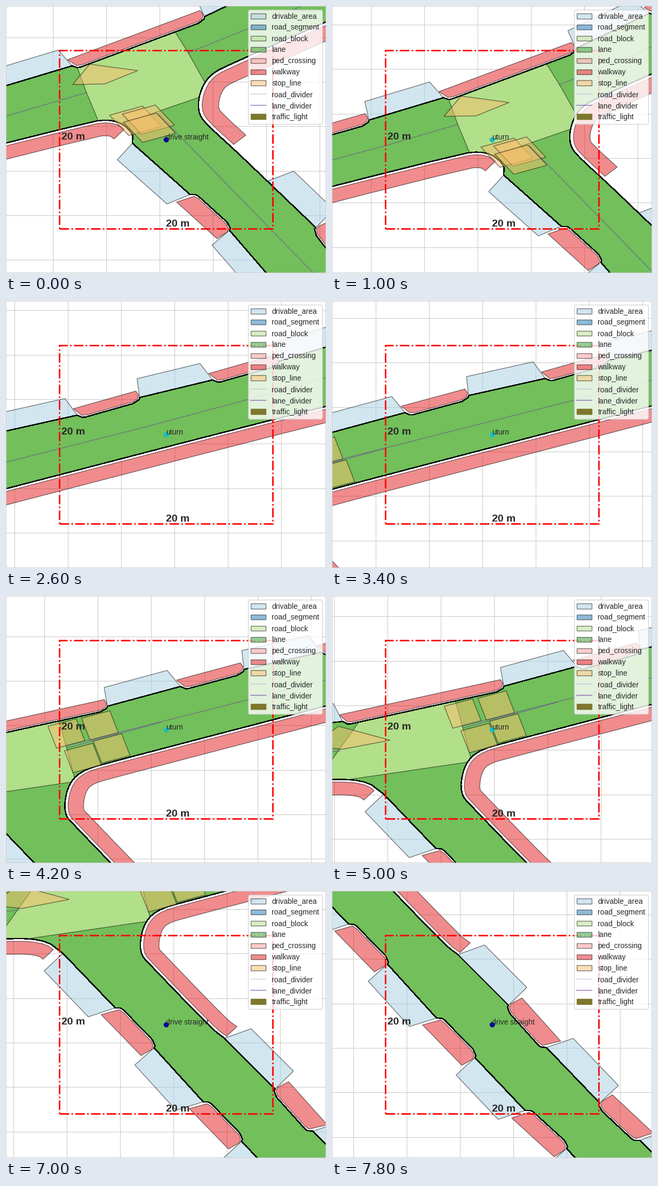
Recreate the animation shown at these times as a matplotlib script. Size 600 by 500 pixels, loop 8000 ms.

```python
import numpy as np
import matplotlib.pyplot as plt
from matplotlib.animation import FuncAnimation
from matplotlib.lines import Line2D
from matplotlib.patches import Patch, Polygon, Rectangle

plt.rcParams.update({
    "font.family": "Liberation Sans", "font.size": 10,
    "text.color": ".15", "figure.dpi": 100,
})

FRAMES, INTERVAL = 40, 200
W, H = 600, 500
M = np.array([20, 50 / 3])  # pixels per metre

# Local origins of the map sections, in pixels
EAST, MID, WEST, SOUTH = (0, 0), (794, -110), (1216, -308), (952, -598)

COLORS = {
    "drivable_area": "#a6cee3", "road_segment": "#1f78b4",
    "road_block": "#b2df8a", "lane": "#33a02c",
    "ped_crossing": "#fb9a99", "walkway": "#e31a1c",
    "stop_line": "#fdbf6f", "road_divider": "#cab2d6",
    "lane_divider": "#6a3d9a", "traffic_light": "#7e772e",
}
EDGE = (0, 0, 0, 0.5)


def at(origin, *xy):
    return np.reshape(xy, (-1, 2)) - np.array(origin, float)


def join(*parts):
    return np.vstack(parts)


def smooth(pts, rounds=2):
    """Round the corners of an open line by corner cutting."""
    for _ in range(rounds):
        a, b = pts[:-1], pts[1:]
        cut = np.stack([0.75 * a + 0.25 * b, 0.25 * a + 0.75 * b], 1)
        pts = join(pts[:1], cut.reshape(-1, 2), pts[-1:])
    return pts


def band(pts, near=0.3, far=1.75):
    """Pavement on the right of a line, between two distances in metres."""
    p = pts / M
    t = np.gradient(p, axis=0)
    t /= np.linalg.norm(t, axis=1, keepdims=True)
    n = np.column_stack([-t[:, 1], t[:, 0]])
    return join(p + n * near, (p + n * far)[::-1]) * M


drivable, walkways = [], []


def frontage(marks, side, bay, reach, depth):
    """Alternate driveway bays and kerbs between marks; return the road edge."""
    edge = [marks[:1]]
    for a, b in zip(marks / M, marks[1:] / M):
        length = np.linalg.norm(b - a)
        u = (b - a) / length
        n = side * np.array([u[1], -u[0]])

        def local(*sd):
            return (a + np.reshape(sd, (-1, 2)) @ [u, n]) * M

        if bay:
            drivable.append(local(0, -0.4, 0, 0, 0.17 * depth, depth,
                                  length - 0.3 * depth, depth, length, 0, length, -0.4))
        else:
            walkways.append(local(-0.15 * reach, reach, length - 0.1, reach, length, 0.3,
                                  length - 0.2, -0.05, length - 0.7, -0.27,
                                  0.9, -0.27, 0.4, -0.15))
            edge.append(local(0.35, -0.38, 0.65, -0.45, length - 0.8, -0.45, length - 0.1, -0.2))
        edge.append(b[None] * M)
        bay = not bay
    return join(*edge)


# Road edges
north = frontage(join(
    at(WEST, -60, 132, 120, 114),
    at(MID, 0, 246, 137, 209, 256, 177, 400, 145, 517, 112, 654, 79, 778, 44),
    at(EAST, 124, 112, 372, 20, 510, -46, 640, -105)), 1, True, 0.8, 2.1)
south_west = frontage(
    at(SOUTH, -67, -40, 31, 62, 104, 137, 196, 238, 268, 312, 362, 411, 440, 482, 560, 617),
    -1, True, 1.5, 2.6)
south_east = frontage(
    at(SOUTH, 720, 605, 577, 467, 502, 397, 402, 293, 331, 214, 236, 119),
    -1, True, 1.5, 2.6)
east_left = frontage(at(EAST, 237, 257, 345, 353, 419, 420, 540, 560), -1, True, 1.5, 2.3)
east_right = frontage(at(EAST, 640, 492, 581, 415, 490, 328), -1, False, 1.5, 2.6)

west_corner = smooth(at(WEST, -60, 228, 60, 223, 160, 222, 197, 250))
east_corner = smooth(at(EAST, 490, 328, 425, 266, 385, 230, 360, 203, 362, 163,
                        382, 128, 425, 107, 640, 12))
block = smooth(join(
    at(WEST, 500, 409, 477, 392, 362, 273, 340, 249, 346, 200, 370, 170, 425, 153),
    at(EAST, 150, 217, 205, 212, 238, 236, 237, 257)))
walkways += [band(west_corner[:-3]), band(east_corner[6:], 0.35, 1.9), band(block[:-7])]

road = join(north, east_corner[::-1], east_right[::-1], east_left[::-1],
            block[::-1], south_east[::-1], south_west[::-1], west_corner[::-1])

junctions = [
    at(EAST, 132, 110, 150, 160, 176, 222, 210, 223, 365, 170, 374, 145, 343, 90, 313, 42),
    at(WEST, 158, 104, 70, 228, 95, 228, 362, 189, 346, 128, 331, 75),
]


def boxes(centres, u, v):
    u, v = np.array(u) / 2, np.array(v) / 2
    return [c + [-u - v, u - v, u + v, v - u] for c in centres]


stops = [at(EAST, 157, 109, 247, 121, 185, 146, 125, 147),
         at(WEST, 62, 160, 112, 123, 209, 149, 120, 166)]
stops += boxes(at(EAST, 243, 215, 267, 213, 269, 228), (62, -17), (36, 38))
stops += boxes(at(WEST, 345, 99, 408, 84, 376, 145, 430, 127), (53, -14), (16, 41))

dividers = [
    at(EAST, 285, 202, 385, 304, 660, 586),
    at(EAST, 341, 88, 455, 42, 640, -36),
    join(at(EAST, 151, 162, 18, 201, -262, 276), at(WEST, 345, 122)),
    join(at(MID, 100, 276), at(WEST, 347, 126)),
    at(WEST, -60, 184, 0, 180, 115, 169),
]


def spline(t, knots, vals):
    """Natural cubic spline through the knots."""
    h = np.diff(knots)
    n = len(knots)
    a, b = np.eye(n), np.zeros(n)
    for i in range(1, n - 1):
        a[i, i - 1:i + 2] = h[i - 1], 2 * (h[i - 1] + h[i]), h[i]
        b[i] = 6 * ((vals[i + 1] - vals[i]) / h[i] - (vals[i] - vals[i - 1]) / h[i - 1])
    m = np.linalg.solve(a, b)
    k = np.clip(np.searchsorted(knots, t, side="right") - 1, 0, n - 2)
    p, q, d = knots[k + 1] - t, t - knots[k], h[k]
    return ((m[k] * p**3 + m[k + 1] * q**3) / (6 * d)
            + (vals[k] / d - m[k] * d / 6) * p
            + (vals[k + 1] / d - m[k + 1] * d / 6) * q)


knots = np.array([0, 5, 9, 17, 25, 31, 39])
steps = np.arange(FRAMES)
cam_x = spline(steps, knots, np.array([300, 215, 38, -494, -816, -916, -652]))
cam_y = spline(steps, knots, np.array([250, 190.3, 220.3, 360, 437, 558, 848]))

fig = plt.figure(figsize=(W / 100, H / 100), facecolor="white")
ax = fig.add_axes([0, 0, 1, 1])
ax.set_axisbelow(True)
ax.set_xticks(88.1 + 100 * np.arange(-16, 9))
ax.set_yticks(58.6 + 250 / 3 * np.arange(-6, 16))
ax.tick_params(length=0, labelbottom=False, labelleft=False)
ax.grid(color=".8", lw=0.8)
ax.spines[:].set(color=".8", lw=1.25)


def fill(shapes, color, z, alpha=0.5, clip=None):
    for pts in shapes:
        patch = ax.add_patch(Polygon(pts, fc=(color, alpha), ec=EDGE, lw=1, zorder=z))
        if clip:
            patch.set_clip_path(clip)


fill(drivable, COLORS["drivable_area"], 1)
fill(walkways, COLORS["walkway"], 1.1)
surface = ax.add_patch(Polygon(road, fc="#72bf5b", ec="none", zorder=1.2))
fill(junctions, COLORS["road_block"], 1.3, 1, surface)
ax.add_patch(Polygon(road, fc="none", ec="black", lw=1, aa=False, zorder=1.5))
fill(stops, COLORS["stop_line"], 1.6)
for line in dividers:
    ax.plot(*line.T, color=COLORS["lane_divider"], alpha=0.5, lw=1.1, zorder=1.7)

# Fixed overlay: range box, position marker and legend
hud = fig.add_axes([0, 0, 1, 1])
hud.axis("off")
hud.set(xlim=(0, W), ylim=(H, 0))
hud.add_patch(Rectangle((100, H - 250 / 3), 400, -1000 / 3, fill=False,
                        ec="red", lw=2, ls="-."))
hud.text(104, 250, "20 m", size=14, weight="bold")
hud.text(300, 413.3, "20 m", size=14, weight="bold")
dot, = hud.plot(300, 250, "o", ms=6)
label = hud.text(300, 250, "")

handles = []
for name, color in COLORS.items():
    if name.endswith("divider"):
        handles.append(Line2D([], [], color=color, alpha=0.5, lw=1.5, label=name))
    elif name == "traffic_light":
        handles.append(Patch(fc=color, ec=color, label=name))
    else:
        handles.append(Patch(fc=(color, 0.5), ec=EDGE, lw=1, label=name))
hud.legend(handles=handles, loc="upper right", framealpha=0.8, edgecolor=".8")


def update(i):
    x, y = cam_x[i], cam_y[i]
    ax.set(xlim=(x - W / 2, x + W / 2), ylim=(y + H / 2, y - H / 2))
    turning = 3 <= i < 35
    dot.set_color("#18bebe" if turning else "#0000a0")
    label.set_text("uturn" if turning else "drive straight")
    return dot, label


anim = FuncAnimation(fig, update, frames=FRAMES, interval=INTERVAL,
                     repeat=True, repeat_delay=0, blit=False)
plt.show()
```
